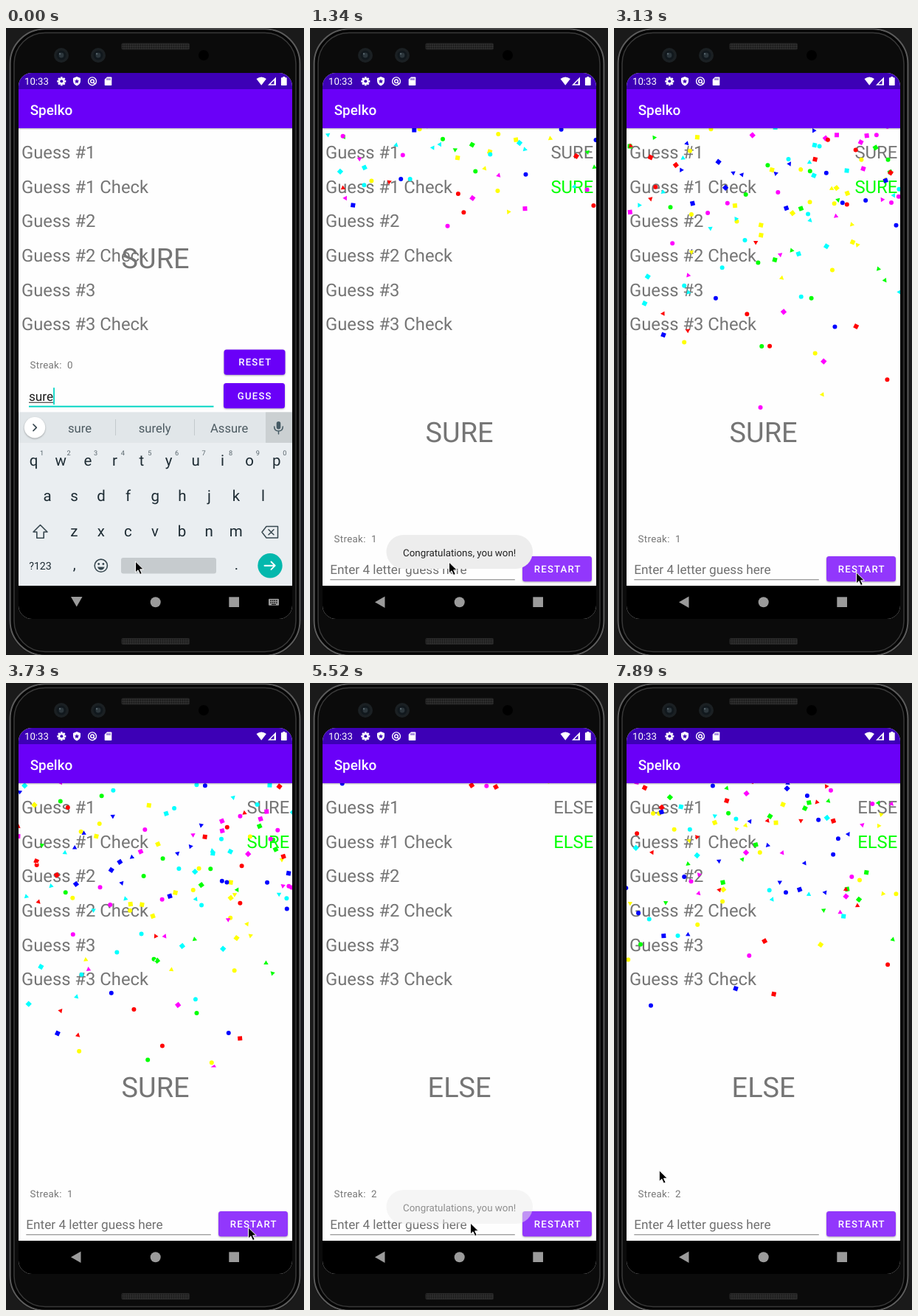
An HTML page that plays this animation: 404 px wide and 851 px high, repeating every 8 s.

```html
<!DOCTYPE html>
<html lang="en">
<head>
<meta charset="utf-8">
<title>Word game</title>
<style>
html, body { margin: 0; width: 100%; height: 100%; overflow: hidden; background: #050505; }
svg { display: block; width: 100%; height: 100%; font-family: Roboto, sans-serif; text-rendering: geometricPrecision; }
.btn { filter: drop-shadow(0 1px 1px rgba(0,0,0,.3)); }
</style>
</head>
<body>
<svg id="stage" viewBox="0 0 404 851"></svg>
<script>
const LOOP = 8000, KB_SHIFT = 235.3, KB_HEIGHT = 236;
const GRAY = '#757575', PURPLE = '#6a00f8', TEAL = '#06d6c5', INK = '#1d2b33';
const COLORS = ['#ffff00', '#00ff00', '#ff00ff', '#ff0000', '#0000ff', '#00ffff'];

const text = (x, y, s, size, fill, more = '') =>
  `<text x="${x}" y="${y}" font-size="${size}" fill="${fill}" xml:space="preserve" ${more}>${s}</text>`;
const rect = (x, y, w, h, fill, rx = 0, more = '') =>
  `<rect x="${x}" y="${y}" width="${w}" height="${h}" rx="${rx}" fill="${fill}" ${more}/>`;
const circle = (x, y, r, fill, more = '') => `<circle cx="${x}" cy="${y}" r="${r}" fill="${fill}" ${more}/>`;
const path = (d, fill, more = '') => `<path d="${d}" fill="${fill}" ${more}/>`;
const line = (d, color, w) => path(d, 'none', `stroke="${color}" stroke-width="${w}" stroke-linecap="round" stroke-linejoin="round"`);
const MID = 'text-anchor="middle"', END = 'text-anchor="end"';

const button = (x, y, w, label, fill) =>
  rect(x, y, w, 34.3, fill, 3.5, 'class="btn"') +
  text(x + w / 2 + .8, y + 22, label, 13.2, '#fff', MID + ' font-weight="500" letter-spacing="1.18"');

function phone() {
  const rim = (x, y, r, color, w) =>
    rect(x, y, 404 - 2 * x, 853 - 2 * y, 'none', r, `stroke="${color}" stroke-width="${w}"`);
  const speaker = y => rect(156.5, y, 92.5, 9, '#242424', 2) + rect(157, y + 1, 91.5, 7, 'url(#mesh)', 2);
  const camera = x => circle(x, 37, 10, '#1b2023') + circle(x, 37, 6.5, '#11181d') +
    circle(x, 37, 3.4, '#2c363c') + circle(x - 2, 35, 1.2, '#56636a');
  return rect(0, 0, 404, 851, '#1a1a1a') +
    rect(4, 1, 396, 852, '#0b0b0b', 48) +
    rim(5.5, 1.5, 47, '#5c5c5c', 2) + rim(8.5, 4, 45, '#050505', 3) + rim(11, 6.5, 42, '#383838', 1.5) +
    speaker(20.5) + speaker(828) + camera(75) + camera(125) + circle(268, 37, 7, '#000');
}

function statusBar() {
  const teeth = [0, 45, 90, 135].map(a =>
    rect(-1.4, -6, 2.8, 12, '#fff', .5, `transform="rotate(${a})"`)).join('');
  return rect(17, 61, 371, 22, '#3d00b6') +
    text(25, 77, '10:33', 13.2, '#fff') +
    `<g transform="translate(75.3 72.3)">${teeth}${circle(0, 0, 4.4, '#fff')}${circle(0, 0, 2, '#3d00b6')}</g>` +
    path('M96 66l5 2v4q0 4-5 6.5q-5-2.5-5-6.5v-4z', '#fff') +
    path('M96 69l.9 2.2 2.3.2-1.7 1.5.5 2.3-2-1.3-2 1.3.5-2.3-1.7-1.5 2.3-.2z', '#3d00b6') +
    circle(117, 72.3, 5.4, 'none', 'stroke="#fff" stroke-width="1.4"') +
    circle(117, 72.3, 2.3, 'none', 'stroke="#fff" stroke-width="1.5"') +
    line('M118.5 74l2 2', '#fff', 1.4) +
    path('M137 66.5h5.5q.8 0 .8.8v9.9q0 .8-.8.8h-8q-.8 0-.8-.8v-7.4z', '#fff') +
    line('M137 68.5v2M139 68.5v2M141 68.5v2', '#3d00b6', .9) +
    path('M339.5 69q6.7-5 13.4 0l-6.7 8.8z', '#fff') +
    path('M366 66.5v11.3h-11z', '#fff') + path('M363.5 71v5.2h-5z', '#3d00b6') +
    path('M375.3 66h3v1.3h1.7q.7 0 .7.7v9.2q0 .7-.7.7h-6.4q-.7 0-.7-.7v-9.2q0-.7.7-.7h1.7z', '#fff');
}

function keyboard() {
  const row = (keys, x0, y) => [...keys].map((k, i) => text(x0 + i * 36.56, y, k, 20.5, INK, MID)).join('');
  const digits = [...'1234567890'].map((k, i) => text(48.5 + i * 36.6, 579.5, k, 9.2, '#58656c', MID)).join('');
  return rect(17, 521.5, 371, KB_HEIGHT, '#eaeef1') +
    rect(17, 521.5, 371, 41.5, '#e1e6e9') + rect(352, 521.5, 36, 41.5, '#cbd0d2') +
    circle(39, 542.3, 14.2, '#fff', 'class="btn"') + line('M37 538l4.3 4.3-4.3 4.3', '#37474f', 1.7) +
    [100, 201.7, 302.7].map((x, i) => text(x, 549, '', 16.6, '#4c5a61', `${MID} id="sug${i}"`)).join('') +
    rect(148, 531, 1, 22, '#c3c9cd') + rect(255, 531, 1, 22, '#c3c9cd') +
    rect(366.7, 534, 5.6, 10.5, '#455a64', 2.8) + line('M363.7 541q0 6 5.8 6q5.8 0 5.8-6M369.5 547v4', '#455a64', 1.5) +
    row('qwertyuiop', 37.7, 594) + digits + row('asdfghjkl', 56, 641.5) + row('zxcvbnm', 92.3, 690) +
    line('M46.5 674.5l9.5 9.5h-4.8v8.3h-9.4v-8.3h-4.8z', '#37474f', 1.6) +
    line('M353 676.5h15.5v15.5h-15.5l-6-7.75zM356 680.8l7 7M363 680.8l-7 7', '#37474f', 1.5) +
    text(46.5, 735, '?123', 14.2, INK, MID) + text(92.7, 735, ',', 20, INK, MID) + text(312.5, 735, '.', 20, INK, MID) +
    circle(128.8, 729.7, 8.6, 'none', 'stroke="#37474f" stroke-width="1.6"') +
    circle(125.7, 727.5, 1.4, '#37474f') + circle(131.9, 727.5, 1.4, '#37474f') +
    path('M124 731.5h9.6q-1.3 4-4.8 4q-3.5 0-4.8-4z', '#37474f') +
    rect(156, 719, 129, 21.6, '#c6cbce', 3) +
    circle(358, 729.7, 16.7, '#04b8ad') + line('M350.5 729.7h14M359.5 724.5l5.2 5.2-5.2 5.2', '#fff', 1.9);
}

function navBar() {
  const dots = [0, 1, 2, 3].map(i => rect(358.3 + i * 2.6, 776.5, 1.5, 1.5, '#000') +
    rect(358.3 + i * 2.6, 779.3, 1.5, 1.5, '#000')).join('');
  return rect(17, 757, 371, 45, '#000') +
    path('M88 772h15.5l-7.75 13.5z', '#9b9b9b', 'id="backDown"') +
    path('M101.5 771.5v15.5l-13.5-7.75z', '#9b9b9b', 'id="backLeft"') +
    circle(202.7, 779.3, 7, '#9b9b9b') + rect(302.3, 772.3, 13.7, 13.7, '#9b9b9b') +
    `<g id="imeIcon">${rect(356, 774.8, 14, 9, '#9b9b9b', 1)}${dots}${rect(360, 781.9, 6, 1, '#000')}</g>`;
}

const rows = [1, 2, 3].map(n =>
  text(21, 177 + (n - 1) * 93.3, 'Guess #' + n, 23.8, GRAY) +
  text(21, 223.6 + (n - 1) * 93.3, `Guess #${n} Check`, 23.8, GRAY)).join('');

document.getElementById('stage').innerHTML = `
<defs>
  <clipPath id="screen">${rect(17, 61, 371, 741, '#fff', 18)}</clipPath>
  <clipPath id="page">${rect(17, 61, 371, 696, '#fff')}</clipPath>
  <clipPath id="rain">${rect(17, 136, 371, 385.5, '#fff')}</clipPath>
  <pattern id="mesh" width="3" height="3" patternUnits="userSpaceOnUse">${circle(1, 1, .8, '#3a3a3a')}${circle(2.5, 2.5, .7, '#161616')}</pattern>
  <linearGradient id="shade" x2="0" y2="1"><stop stop-color="#000" stop-opacity=".25"/><stop offset="1" stop-color="#000" stop-opacity="0"/></linearGradient>
</defs>
${phone()}
<g clip-path="url(#screen)">
  ${rect(17, 61, 371, 741, '#fefefe')}
  <g id="app">
    ${rows}
    ${text(384.2, 177, '', 23.8, GRAY, END + ' id="guess"')}
    ${text(384.2, 223.6, '', 23.8, '#00ff00', END + ' id="check"')}
    <g id="form">
      ${text(202.6, 561.5, '', 37.9, GRAY, MID + ' id="word"')}
      ${text(32.5, 697.7, '', 13.3, GRAY, 'letter-spacing=".34" id="streak"')}
      <g id="play">${button(295.5, 671.7, 83, 'RESET', PURPLE)}${button(295, 717.2, 83, 'GUESS', PURPLE)}</g>
      <g id="again">${button(288, 717, 94, 'RESTART', '#9237fc')}</g>
      ${text(31, 741, 'Enter 4 letter guess here', 17.2, '#707070', 'id="hint"')}
      ${text(31, 741, '', 17.2, '#1c1c1c', 'id="typed"')}
      <rect id="under" x="31" y="743" height="1.1" fill="#333"/>
      <rect id="caret" y="723.5" width="1.8" height="23" fill="${TEAL}"/>
      <rect id="field" width="250.5"/>
    </g>
    <g id="confetti" clip-path="url(#rain)">${COLORS.map(c => path('', c)).join('')}</g>
    ${rect(17, 83, 371, 53, PURPLE)}${rect(17, 136, 371, 2.5, 'url(#shade)')}
    ${text(32.7, 117.5, 'Spelko', 18.9, '#fff', 'font-weight="500"')}
  </g>
  ${statusBar()}
  <g clip-path="url(#page)"><g id="keys">${keyboard()}</g></g>
  ${navBar()}
  <g id="toast">${rect(103.5, 688, 198.5, 46, '#ededed', 23)}${text(126, 716.5, 'Congratulations, you won!', 13.35, '#222')}</g>
</g>
<g id="mouse">${path('M0 0v15l3.5-3.2 2.6 5.8 2.7-1.2-2.6-5.6h4.7z', '#000', 'stroke="#fff" stroke-width="1"')}</g>`;

const el = {};
document.querySelectorAll('#stage [id]').forEach(n => el[n.id] = n);
const layers = [...el.confetti.children];
const show = (node, on) => node.setAttribute('display', on ? 'inline' : 'none');
const move = (node, x, y) => node.setAttribute('transform', `translate(${x} ${y})`);
const set = (node, attrs) => { for (const k in attrs) node.setAttribute(k, attrs[k]); };
const clamp = v => Math.max(0, Math.min(1, v));
const ramp = (t, a, b) => clamp((t - a) / (b - a));
const ease = v => v * v * (3 - 2 * v);

function random(seed) {
  return () => {
    seed = seed + 0x6D2B79F5 | 0;
    let v = Math.imul(seed ^ seed >>> 15, 1 | seed);
    v = v + Math.imul(v ^ v >>> 7, 61 | v) ^ v;
    return ((v ^ v >>> 14) >>> 0) / 4294967296;
  };
}

function makeRain(seed) {
  const r = random(seed);
  return Array.from({ length: 190 }, (_, i) => ({
    born: i * 21, x: 2 + r() * 400, vx: (r() - .5) * .05, vy: .043 + r() * .096,
    turn: r() * 6.28, spin: (r() - .5) * .008, color: r() * 6 | 0, shape: r() * 3 | 0
  }));
}

// Circles are two arcs; squares and triangles are rotated polygons.
function piece(p, age) {
  const x = p.x + p.vx * age, y = 133 + p.vy * age, n = p.shape + 2;
  if (n === 2) return `M${x - 3} ${y}a3 3 0 1 0 6 0a3 3 0 1 0-6 0`;
  const size = n === 3 ? 3.7 : 4.2, a = p.turn + p.spin * age;
  const corners = Array.from({ length: n }, (_, i) => {
    const b = a + i * 2 * Math.PI / n;
    return (x + size * Math.cos(b)).toFixed(2) + ' ' + (y + size * Math.sin(b)).toFixed(2);
  });
  return 'M' + corners.join('L') + 'Z';
}

const rounds = [
  { word: 'SURE', won: 150, rain: makeRain(11), start: 185, hints: ['sure', 'surely', 'Assure'] },
  { word: 'ELSE', won: 5330, rain: makeRain(47), start: 5430, hints: ['else', 'elsewhere', 'Elsewise'] }
];
const RESTART = 3980, KB_OPEN = 4760, TYPE = 4900;
const track = [[0, 175.5, 724], [400, 175.5, 724], [1000, 188.5, 725], [1500, 188.5, 725], [1850, 261, 757],
  [2230, 328.5, 739], [4040, 328.5, 739], [4460, 217.5, 733], [5740, 217.5, 733], [6950, 61.3, 661.5], [LOOP, 61.3, 661.5]];

function pointer(t) {
  const i = track.findIndex(k => k[0] > t), a = track[i - 1], b = track[i];
  const u = ease(ramp(t, a[0], b[0]));
  return [a[1] + (b[1] - a[1]) * u, a[2] + (b[2] - a[2]) * u];
}

function draw(t) {
  const second = t >= RESTART, game = rounds[+second], won = t >= game.won;
  const open = !won && (!second || t >= KB_OPEN);
  const focus = !won && (!second || t >= 4540);
  const age = t - game.start;

  el.guess.textContent = el.check.textContent = won ? game.word : '';
  el.word.textContent = game.word;
  el.streak.textContent = 'Streak:  ' + (second + won);
  show(el.play, !won);
  show(el.again, won);
  move(el.form, 0, open ? -KB_SHIFT : 0);
  el.app.setAttribute('opacity', second ? .3 + .7 * ramp(t, RESTART, RESTART + 170) : 1);

  const count = !open ? 0 : second ? Math.max(0, Math.min(4, Math.floor((t - TYPE) / 90))) : 4;
  const typed = game.word.toLowerCase().slice(0, count);
  el.typed.textContent = typed;
  const width = typed ? el.typed.getComputedTextLength() : 0;
  show(el.hint, !typed);
  el.hint.setAttribute('x', won ? 27.3 : 31);
  el.under.setAttribute('width', width);
  el.caret.setAttribute('x', 31 + width);
  show(el.caret, open);
  set(el.field, { x: won ? 27.3 : 31, y: focus ? 748 : 748.3, height: focus ? 2 : 1, fill: focus ? TEAL : '#7a7a7a' });

  const slide = won ? ramp(t, game.won, game.won + 170) : second ? 1 - ease(ramp(t, KB_OPEN - 40, KB_OPEN + 150)) : 0;
  show(el.keys, slide < 1);
  move(el.keys, 0, KB_HEIGHT * slide);
  game.hints.forEach((s, i) => el['sug' + i].textContent = typed ? s : '');
  show(el.backDown, open);
  show(el.imeIcon, open);
  show(el.backLeft, !open);

  const paths = COLORS.map(() => '');
  for (const p of game.rain) if (age > p.born) paths[p.color] += piece(p, age - p.born);
  layers.forEach((n, i) => n.setAttribute('d', paths[i]));

  el.toast.setAttribute('opacity', Math.min(ramp(age, 10, 170), 1 - ramp(age, 2200, 2420)));
  move(el.mouse, ...pointer(t));
}

function frame() {
  draw(performance.now() % LOOP);
  requestAnimationFrame(frame);
}
frame();
</script>
</body>
</html>
```
